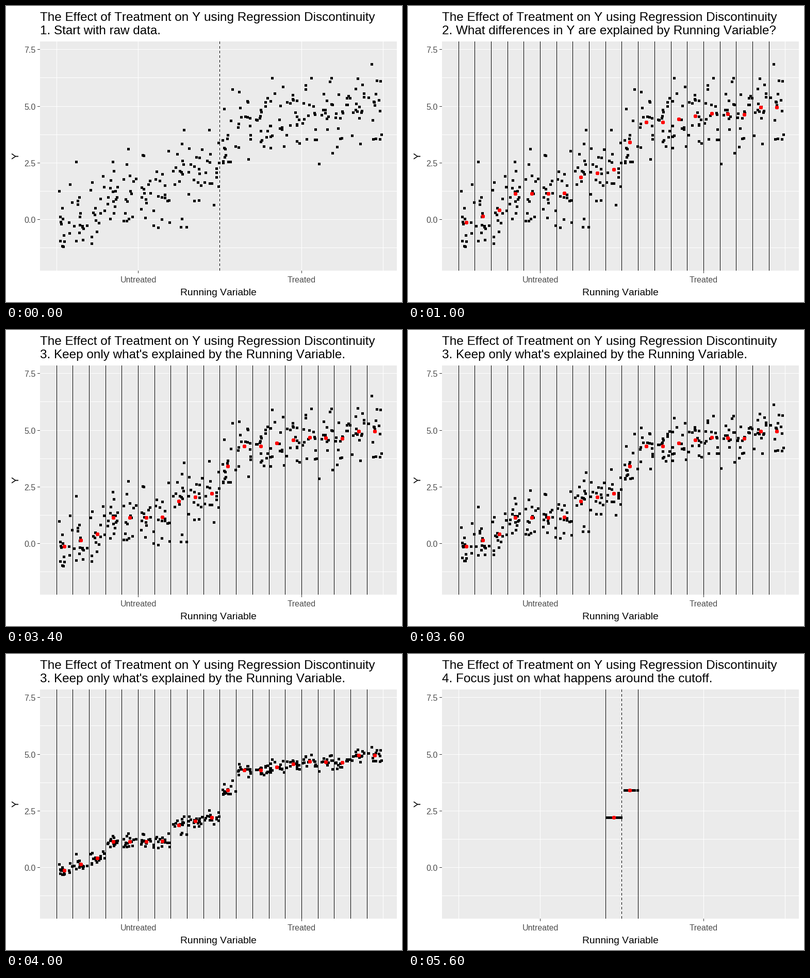
A matplotlib script for the animation above (8 s loop, 768 px wide and 576 px high).

```python
import math

import matplotlib.pyplot as plt
import numpy as np
from matplotlib.animation import FuncAnimation
from matplotlib.patches import Rectangle

W, H, DPI = 768, 576, 72
LEFT, TOP, RIGHT, BOTTOM = 66, 69, 758, 515
BIN_START, BIN_WIDTH = 98.18, 31.68
BINS, PER_BIN = 20, 15
CUTOFF_BIN = BINS // 2
ZERO_Y, UNIT = 415.8, 44.13
FRAMES, INTERVAL = 80, 100

plt.rcParams["font.family"] = ["Liberation Sans", "DejaVu Sans"]
plt.rcParams["text.kerning_factor"] = 6

SUBTITLES = [
    "1. Start with raw data.",
    "2. What differences in Y are explained by Running Variable?",
    "3. Keep only what's explained by the Running Variable.",
    "4. Focus just on what happens around the cutoff.",
]
SUBTITLE_STARTS = (5, 31, 56)

# Key points (bin, mean of Y) on either side of the cutoff
MEAN_CURVE = [(0, -0.12), (2, 0.42), (3, 1.13), (6, 1.16), (7, 1.87), (9, 2.2),
              (10, 3.4), (11, 4.3), (12, 4.3), (15, 4.68), (17, 4.62), (18, 4.95)]


def x_pixel(position):
    """Pixel column of a position counted in bins."""
    return np.floor(BIN_START + BIN_WIDTH * position)


def y_pixel(value):
    return np.floor(ZERO_Y - UNIT * value)


def make_data():
    """Return positions, means and residuals, one row per bin."""
    rng = np.random.default_rng(8)
    bins = np.arange(BINS)
    means = np.interp(bins, *zip(*MEAN_CURVE))[:, None]
    positions = bins[:, None] + rng.uniform(0.06, 0.96, (BINS, PER_BIN))
    residuals = rng.normal(0, 0.95, (BINS, PER_BIN))
    residuals -= residuals.mean(axis=1, keepdims=True)
    return positions, means, np.clip(residuals, -2.2, 2.4)


fig = plt.figure(figsize=(W / DPI, H / DPI), dpi=DPI, facecolor="white")
ax = fig.add_axes([0, 0, 1, 1])
ax.set_xlim(0, W)
ax.set_ylim(H, 0)
ax.axis("off")


def line(xs, ys, color, z=1, style="-"):
    return ax.plot(xs, ys, color=color, lw=1, ls=style, zorder=z, snap=False,
                   antialiased=False, solid_capstyle="butt")[0]


def vline(x, color, z=1, style="-", start=BOTTOM, end=TOP):
    return line([x + 0.5] * 2, [start, end], color, z, style)


def hline(y, color, start=LEFT, end=RIGHT):
    return line([start, end], [y + 0.5] * 2, color)


def label(x, y, text, size, color="black", ha="left", **extra):
    return ax.text(x, y, text, fontsize=size, color=color, ha=ha,
                   va="baseline", **extra)


def dots(diameter, color, z):
    artist = ax.scatter([], [], s=diameter ** 2, c=color, linewidths=0, zorder=z)
    # More than one flag keeps dots centred on pixels instead of pixel corners
    artist.set_antialiased([False, False])
    return artist


def place(artist, columns, rows):
    artist.set_offsets(np.column_stack([columns.ravel(), rows.ravel()]) + 0.5)


# Panel, grid and axes
ax.add_patch(Rectangle((LEFT, TOP), RIGHT - LEFT, BOTTOM - TOP,
                       color="#EBEBEB", lw=0, zorder=0))
for position in range(0, BINS + 1, 5):
    vline(x_pixel(position), "white")
for value in np.arange(-1.25, 7.6, 1.25):
    row = y_pixel(value)
    hline(row, "white")
    if value % 2.5 == 0:
        hline(row, "#333333", LEFT - 5, LEFT)
        label(57.5, row + 7, f"{value:.1f}", 16, "#4D4D4D", "right")
for position, name in ((5, "Untreated"), (15, "Treated")):
    x = x_pixel(position)
    vline(x, "#333333", start=BOTTOM, end=BOTTOM + 5)
    label(x + 0.5, 538, name, 16, "#4D4D4D", "center")

label(66, 29, "The Effect of Treatment on Y using Regression Discontinuity", 24.2)
subtitle = label(66, 55, "", 24.2)
label(411.5, 563, "Running Variable", 19.3, ha="center")
label(25, 292, "Y", 19.3, ha="center", rotation=90, rotation_mode="anchor")

# Data layers
positions, bin_means, residuals = make_data()
columns = x_pixel(positions)
mean_columns = x_pixel(np.arange(BINS) + 0.496)
points = dots(5, "black", 2)
bin_lines = [vline(x_pixel(k), "black", 3) for k in range(BINS)]
cutoff_line = vline(x_pixel(CUTOFF_BIN), "black", 3, (0, (4, 4)))
mean_dots = dots(7, "red", 4)


def update(frame):
    binned, focused = frame >= 10, frame >= 56
    subtitle.set_text(SUBTITLES[sum(frame >= s for s in SUBTITLE_STARTS)])

    t = min(max((frame - 30) / 14, 0), 1)
    ease = (1 - math.cos(math.pi * t)) / 2
    rows = y_pixel(bin_means + residuals * (1 - ease))
    shown = slice(CUTOFF_BIN - 1, CUTOFF_BIN + 1) if focused else slice(None)
    place(points, columns[shown], rows[shown])
    place(mean_dots, mean_columns[shown], y_pixel(bin_means)[shown])

    mean_dots.set_visible(binned)
    cutoff_line.set_visible(focused or not binned)
    for k, edge in enumerate(bin_lines):
        edge.set_visible(abs(k - CUTOFF_BIN) == 1 if focused else binned)
    return []


anim = FuncAnimation(fig, update, frames=FRAMES, interval=INTERVAL,
                     repeat=True, repeat_delay=0, blit=False)
plt.show()
```
